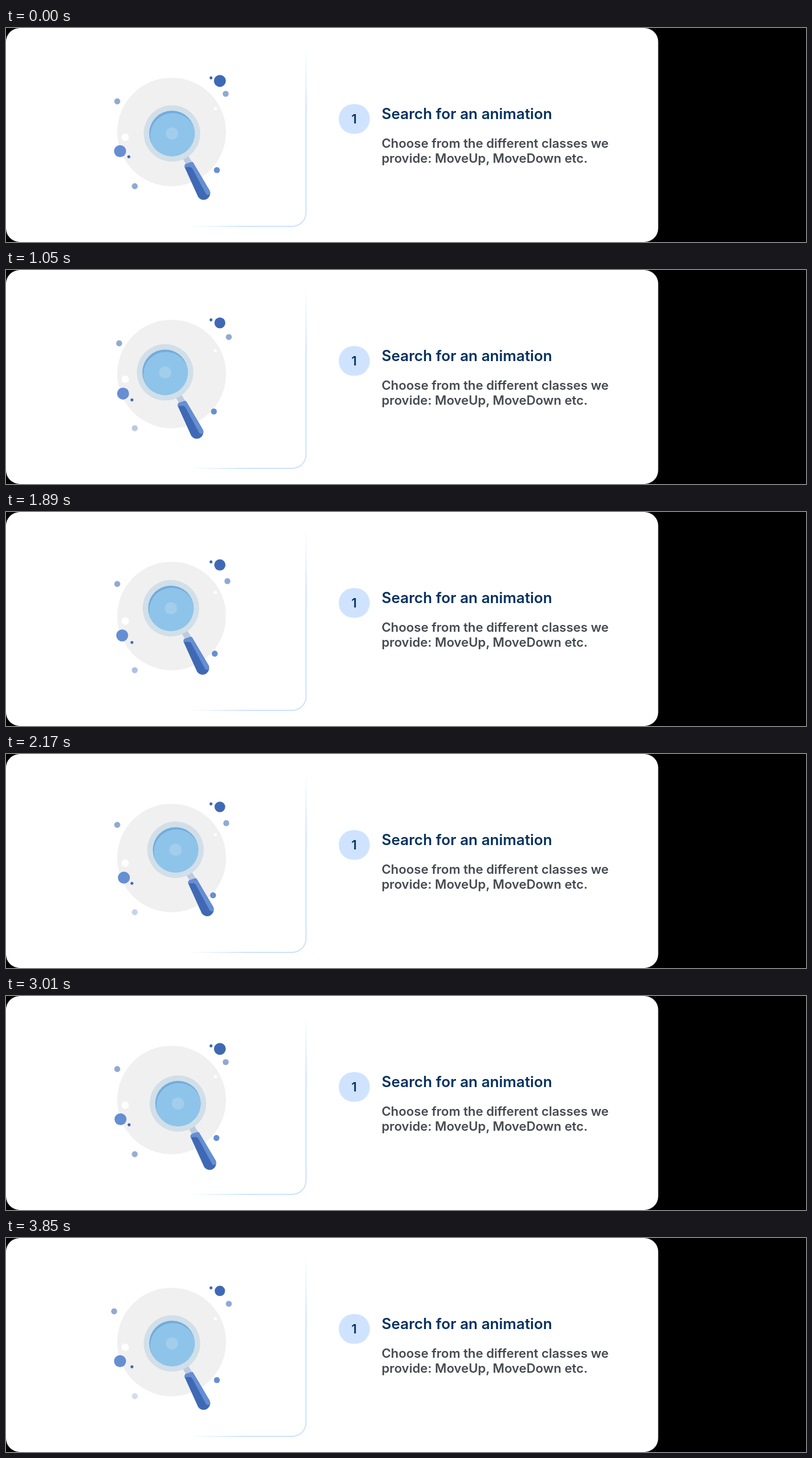
Write an HTML page with a canvas that moves like this. It is 1280 px wide and 343 px high and loops after 3920 ms.

```html
<!DOCTYPE html>
<html lang="en">
<head>
<meta charset="utf-8">
<title>Search for an animation</title>
<style>
  html, body { margin: 0; width: 100%; height: 100%; overflow: hidden; background: #000; }
  canvas, svg { position: absolute; left: 0; top: 0; width: 1280px; height: 343px; }
  text { font-family: Rubik, Inter, sans-serif; font-weight: 600; }
  .title { font-size: 23.8px; fill: #03305f; }
  .body { font-size: 20.2px; fill: #454950; }
  .step { font-size: 20px; fill: #03305f; text-anchor: middle; }
</style>
</head>
<body>
<canvas id="stage" width="1280" height="343"></canvas>
<svg viewBox="0 0 1280 343">
  <text class="step" x="557" y="153">1</text>
  <text class="title" x="601" y="146">Search for an animation</text>
  <text class="body" x="601" y="192">Choose from the different classes we</text>
  <text class="body" x="601" y="216">provide: MoveUp, MoveDown etc.</text>
</svg>
<script>
const ctx = document.getElementById('stage').getContext('2d');
const LOOP = 3920, STEP = 70, LEG = 770;
const NAVY = '#3f69b4', BLUE = '#668ed2', HAZE = '#90aad1';

const body = new Path2D('M20.3 54Q19.8 50 22 49L31 46Q33 45.4 34 47L60.5 92A10.6 10.6 0 0 1 42 102Z');
const shine = new Path2D('M20.3 55Q19.8 50 22 49L31 46Q33 45.4 34 47L60.5 92Q62 97 59.5 98.3Q56.5 99.4 54.5 97L33 57Q31 53.2 27 53.8Q23 53.5 20.3 55Z');
const neck = new Path2D('M17 40L26 35.5L33 47L23.5 51Z');

// Stops as [time, x, y], joined by straight moves
const lensPath = [
  [0, 265.5, 169], [LEG, 254.5, 169], [2 * LEG, 254.6, 155.2], [3 * LEG, 275, 153.2],
  [2660, 277, 163], [4 * LEG, 274.8, 174.2], [5 * LEG, 265.5, 169], [LOOP, 265.5, 169]
];

// Equal legs through a list of points, repeating
const tour = points => [0, 1, 2, 3, 4, 5, 6].map(i => [i * LEG, ...points[i % points.length]]);
const rightPath = tour([[351.5, 105.5], [356.5, 105.5], [356.5, 110.9], [351.5, 110.9]]);
const lowPath = tour([[196.5, 206.5], [201.5, 206.5], [201.5, 211.3], [201.5, 206.5]]);
const topPath = tour([[178, 117.6], [182.8, 117.6], [178, 117.6], [178, 112.8], [178, 117.6], [173, 117.6]]);

function along(path, t) {
  let i = 1;
  while (i < path.length - 1 && t >= path[i][0]) i++;
  const [t0, x0, y0] = path[i - 1], [t1, x1, y1] = path[i];
  const k = (t - t0) / (t1 - t0);
  return [x0 + (x1 - x0) * k, y0 + (y1 - y0) * k];
}

function dot(x, y, r, color) {
  ctx.fillStyle = color;
  ctx.beginPath();
  ctx.arc(x, y, r, 0, 7);
  ctx.fill();
}

function box(x, y, w, h, r, color) {
  ctx.fillStyle = color;
  ctx.beginPath();
  ctx.roundRect(x, y, w, h, r);
  ctx.fill();
}

function fade(x0, y0, x1, y1) {
  const g = ctx.createLinearGradient(x0, y0, x1, y1);
  g.addColorStop(0, '#cfe4ff00');
  g.addColorStop(1, '#cfe4ff');
  return g;
}

function drawPanel() {
  ctx.lineWidth = 2;
  ctx.strokeStyle = fade(0, 28, 0, 135);
  ctx.beginPath();
  ctx.moveTo(474, 28);
  ctx.quadraticCurveTo(480, 35, 480, 46);
  ctx.lineTo(480, 296);
  ctx.arc(458, 296, 22, 0, Math.PI / 2);
  ctx.stroke();
  ctx.strokeStyle = fade(290, 0, 390, 0);
  ctx.beginPath();
  ctx.moveTo(290, 318);
  ctx.lineTo(458, 318);
  ctx.stroke();
}

function drawLens(x, y) {
  ctx.save();
  ctx.translate(x, y);
  ctx.fillStyle = '#bccbdf';
  ctx.fill(neck);
  ctx.fillStyle = NAVY;
  ctx.fill(body);
  ctx.fillStyle = BLUE;
  ctx.fill(shine);
  dot(0, 0, 45.2, '#d1dfe8');
  dot(0, 0, 36.4, '#73abde');
  ctx.beginPath();
  ctx.arc(0, 0, 36.4, 0, 7);
  ctx.clip();
  dot(1.3, 3.2, 36, '#8ec4ea');
  dot(0, 0, 9.8, '#a2ceec');
  ctx.restore();
}

function draw(t) {
  const swing = 1 - Math.abs(t / LEG % 2 - 1);
  const slide = t < 4 * LEG ? swing : 0;

  ctx.clearRect(0, 0, 1280, 343);
  box(0, 0, 1043.5, 343, 22, '#fff');
  drawPanel();
  box(532.5, 122, 49.5, 47.5, 23, '#cfe3ff');

  dot(265, 166.7, 87, '#f0f0f1');
  dot(190.7, 175, 6, '#fff');
  dot(335, 129, 2.6, '#fff');

  dot(328, 80, 2.4, NAVY);
  dot(342.2, 84.8, 9.6 - 1.3 * swing, NAVY);
  dot(...along(rightPath, t), 4.8, HAZE);
  dot(...along(topPath, t), 4.8, HAZE);
  dot(182.5 + 7.5 * slide, 197.4 + slide, 9.6, BLUE);
  dot(337.4 - 7.5 * slide, 227.8 - 1.5 * slide, 4.8, BLUE);
  dot(...along(lowPath, t), 2.4, NAVY);
  ctx.globalAlpha = 1 - 0.6 * swing;
  dot(206, 253.6, 4.8, HAZE);
  ctx.globalAlpha = 1;

  drawLens(...along(lensPath, t));
}

let start;
function tick(now) {
  start ??= now;
  draw(Math.floor((now - start) % LOOP / STEP) * STEP);
  requestAnimationFrame(tick);
}
draw(0);
requestAnimationFrame(tick);
</script>
</body>
</html>
```
